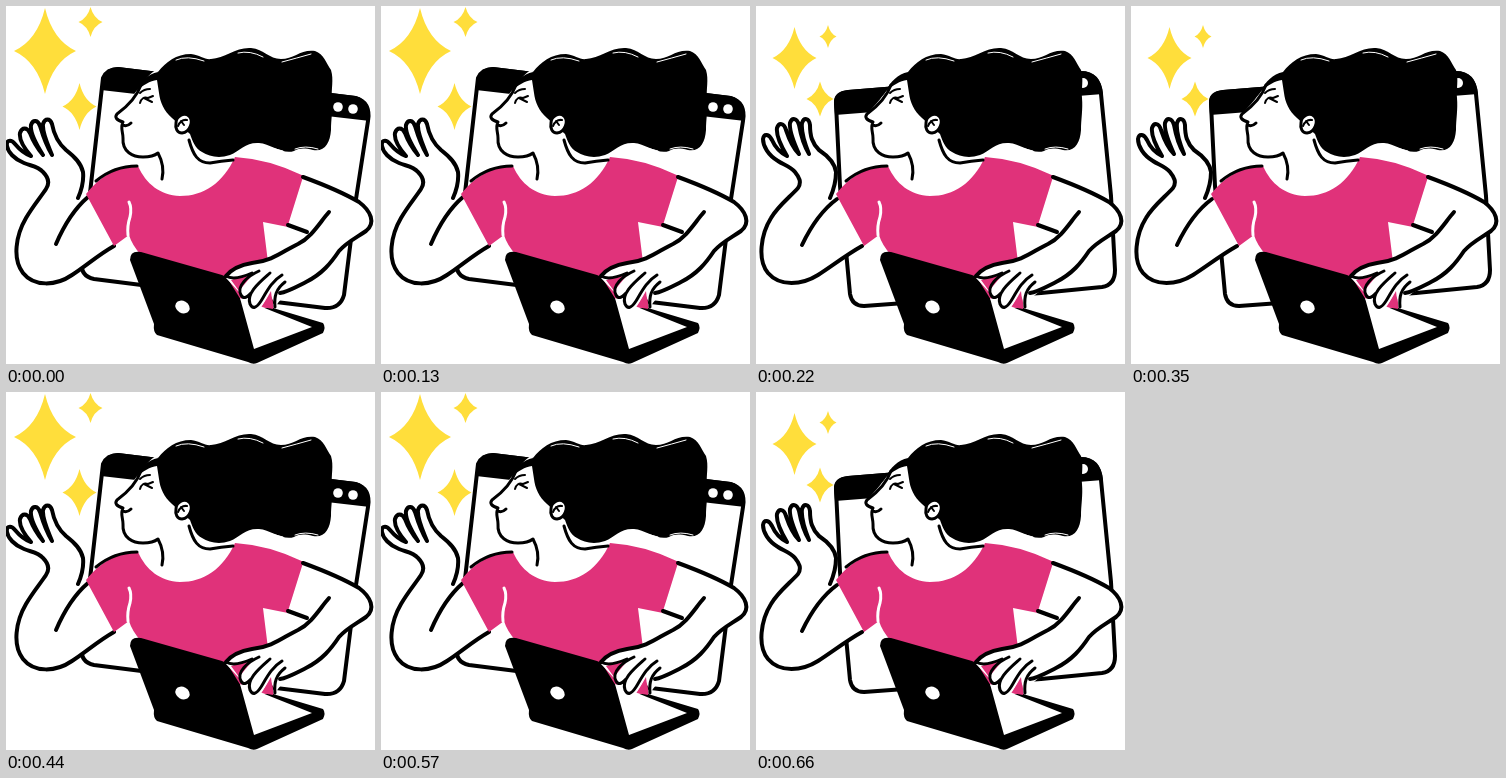
These frames come from a looping animation (369x358 px, 880 ms). An HTML page:

```html
<!DOCTYPE html>
<html lang="en">
<head>
<meta charset="utf-8">
<title>Laptop and sparkles</title>
<style>
  html, body { margin: 0; width: 100%; height: 100%; overflow: hidden; background: #fff; }
  svg { display: block; width: 100%; height: 100%; }
  .line { fill: none; stroke: #000; stroke-width: 4; stroke-linecap: round; stroke-linejoin: round; }
  .skin { fill: #fff; }
  .thin { stroke-width: 3; }
  .fine { stroke-width: 2; }
  .ink { fill: #000; }
  .pink { fill: #e0327a; }
  .star { fill: #ffde3b; }
  .white { fill: #fff; }
  .fold { stroke: #fff; stroke-width: 3; }
  .shine { fill: none; stroke: #fff; stroke-width: 1; stroke-linecap: round; }
</style>
</head>
<body>
<svg viewBox="0 0 369 358" preserveAspectRatio="xMidYMid meet">
  <!-- window, arm and sparkles: raised pose -->
  <g class="pose" id="high">
    <path class="line skin" d="M97 72Q101 63 112 63L349 92Q365 96 362 115L350 193L338 289Q334 303 319 302L270 296L88 273Q74 270 76 256L84 187Z"/>
    <path class="ink" d="M95 84L97 71Q101 61 112 61L350 90Q366 95 364 115Z"/>
    <circle class="white" cx="332" cy="101" r="4.8"/>
    <circle class="white" cx="347" cy="103" r="4.8"/>
    <path class="white" d="M70 200L84 184L108 240L60 240Z"/>
    <path class="line skin" d="M108 240C92 249 80 260 66 269C50 280 28 281 17 267C6 253 10 229 20 212C27 200 34 192 40 183C44 177 42 171 37 166C32 160 25 160 18 157C8 153 2 146 1 140C0 134 5 133 9 138C14 144 19 148 25 150C18 142 13 133 14 127C16 121 21 121 24 127C27 135 32 143 37 149C30 138 24 126 25 119C27 113 32 114 34 120C37 130 41 141 46 149C42 139 36 127 37 118C39 112 44 112 46 118C48 129 52 137 60 144C69 151 75 157 77 166C78 176 76 183 72 192"/>
    <path class="line" d="M82 191C68 203 59 217 50 238"/>
  </g>
  <!-- lowered pose -->
  <g class="pose" id="low">
    <path class="line skin" d="M80 98Q79 87 92 86L325 67Q343 67 345 88L355 190L359 264Q359 279 346 281L285 287L108 300Q96 300 94 288L84 180Z"/>
    <path class="ink" d="M79 109L78 96Q78 86 92 84L325 65Q345 66 347 88Z"/>
    <circle class="white" cx="327" cy="77" r="5"/>
    <path class="white" d="M70 200L84 184L108 240L60 240Z"/>
    <path class="line skin" d="M106 240C90 249 76 260 62 269C46 279 24 281 12 267C1 254 5 228 15 212C22 200 34 191 42 182C46 176 43 171 39 166C34 160 28 159 22 155C12 149 7 140 7 133C8 127 13 128 16 134C19 141 25 147 31 150C25 140 20 129 21 122C23 116 28 117 30 124C33 133 37 142 43 148C38 137 33 124 34 117C36 111 41 112 43 119C45 130 48 140 53 148C49 138 45 125 46 117C48 111 53 112 54 119C54 130 56 137 63 144C72 150 79 158 80 166C80 176 78 183 74 192"/>
    <path class="line" d="M81 193C66 204 56 218 46 239"/>
  </g>

  <!-- head and neck -->
  <path class="skin" d="M150 64C137 72 131 88 110 109L116 117L116 130Q119 148 138 150L152 148L157 170L130 160L150 190H210L228 154L190 152L180 90Z"/>
  <path class="line thin" d="M135 79C131 90 122 100 111 108Q107 113 117 116C114 121 117 126 117 132C116 146 127 151 137 151Q147 151 152 147Q159 160 156 173M117 119Q121 121 125 117"/>
  <path class="line fine" d="M134 97Q136 90 142 92L147 90M138 92L146 96M134 87Q138 83 144 83"/>

  <!-- hair -->
  <path class="ink" d="M130 85C134 76 142 68 152 66C160 56 170 48 185 48C194 49 199 54 205 53C219 52 230 41 245 42C258 43 263 53 275 53C288 53 295 43 309 45C318 48 320 57 325 64C328 74 325 83 326 92C327 104 325 113 325 124C324 137 319 146 307 144C298 142 294 142 288 145C277 149 265 138 253 137C240 136 234 145 224 149C212 153 203 150 196 146C189 142 187 136 184 128L166 112C158 105 154 96 153 87L151 74C144 75 137 79 130 85Z"/>
  <path class="shine" d="M170 54Q181 49 198 55M232 47Q244 44 257 51M276 56Q291 52 305 48M250 139Q264 141 277 145M289 143Q299 139 312 143"/>
  <path class="line skin thin" d="M170 117C170 110 178 106 183 110C188 115 184 126 176 127C171 127 169 122 170 117Z"/>
  <path class="line fine" d="M172 120Q175 113 181 114M175 115L178 119"/>

  <!-- shirt -->
  <path class="pink" d="M132 160C112 160 94 170 80 188L108 240L123 229Q126 239 135 249L150 262L268 305L257 216L282 221L298 170Q263 153 229 151C217 177 198 190 174 190C154 189 140 178 132 160Z"/>
  <path class="line thin" d="M131 160C116 160 102 165 90 175M183 134C187 149 192 157 204 157Q215 155 227 154"/>
  <path class="line fold" d="M123 196Q126 202 124 211Q121 220 122 229"/>

  <!-- laptop -->
  <path class="ink" d="M124 254Q124 244 135 246L216 269Q222 271 225 278L240 302L267 302L317 317Q320 321 317 327L251 357Q247 359 242 356L151 329Q147 326 148 318Z"/>
  <path class="white" d="M234 292L248 343L306 321L266 305Z"/>
  <ellipse class="white" cx="176.500" cy="301" rx="7.500" ry="6" transform="rotate(30 176.500 301)"/>

  <!-- typing arm -->
  <path class="skin" d="M297 171C316 178 336 186 353 196C365 205 370 217 360 225C350 232 341 236 333 245C325 257 316 268 300 276C286 282 276 290 270 300L264 288L256 300L249 303L237 295L233 286L220 272Q226 261 246 257C266 255 278 246 290 239L301 226L282 219Z"/>
  <path class="pink" d="M225 274L247 268L233 285ZM256 301L265 285L267 303Z"/>
  <path class="line" d="M297 171C316 178 336 186 353 196C365 205 370 217 360 225C350 232 341 236 333 245C325 257 316 268 300 276C290 281 281 286 274 287M282 219L301 226M323 206C314 216 306 231 292 238C277 245 267 255 246 257Q228 260 220 270"/>
  <path class="line thin" d="M220 270Q228 275 246 267M253 265C242 270 230 280 235 289Q238 295 245 287M264 267C254 276 240 287 244 298Q248 306 255 295M276 269C266 275 261 285 255 295M279 276C270 283 268 290 269 301"/>
</svg>
<script>
  const STEP = 220;
  const NS = 'http://www.w3.org/2000/svg';

  // centre x, centre y, half width, half height
  const sparkles = {
    high: [[39, 45, 31, 43], [84.5, 16, 12, 15], [73.5, 100.5, 17, 23.5]],
    low: [[38.5, 52, 22, 31], [72, 30.5, 8.5, 11.5], [64, 93, 13.5, 17.5]]
  };

  function starPath([x, y, w, h]) {
    const a = w * 0.25, b = h * 0.25;
    return `M${x} ${y - h}Q${x + a} ${y - b} ${x + w} ${y}` +
      `Q${x + a} ${y + b} ${x} ${y + h}` +
      `Q${x - a} ${y + b} ${x - w} ${y}` +
      `Q${x - a} ${y - b} ${x} ${y - h}Z`;
  }

  // Two poses take turns, each held for one step.
  const turns = { high: [1, 0], low: [0, 1] };

  for (const [id, stars] of Object.entries(sparkles)) {
    const pose = document.getElementById(id);
    for (const star of stars) {
      const path = document.createElementNS(NS, 'path');
      path.setAttribute('class', 'star');
      path.setAttribute('d', starPath(star));
      pose.append(path);
    }
    const [first, second] = turns[id];
    pose.animate([
      { opacity: first, offset: 0, easing: 'step-end' },
      { opacity: second, offset: 0.5, easing: 'step-end' },
      { opacity: second, offset: 1 }
    ], { duration: 2 * STEP, iterations: Infinity });
  }
</script>
</body>
</html>
```
